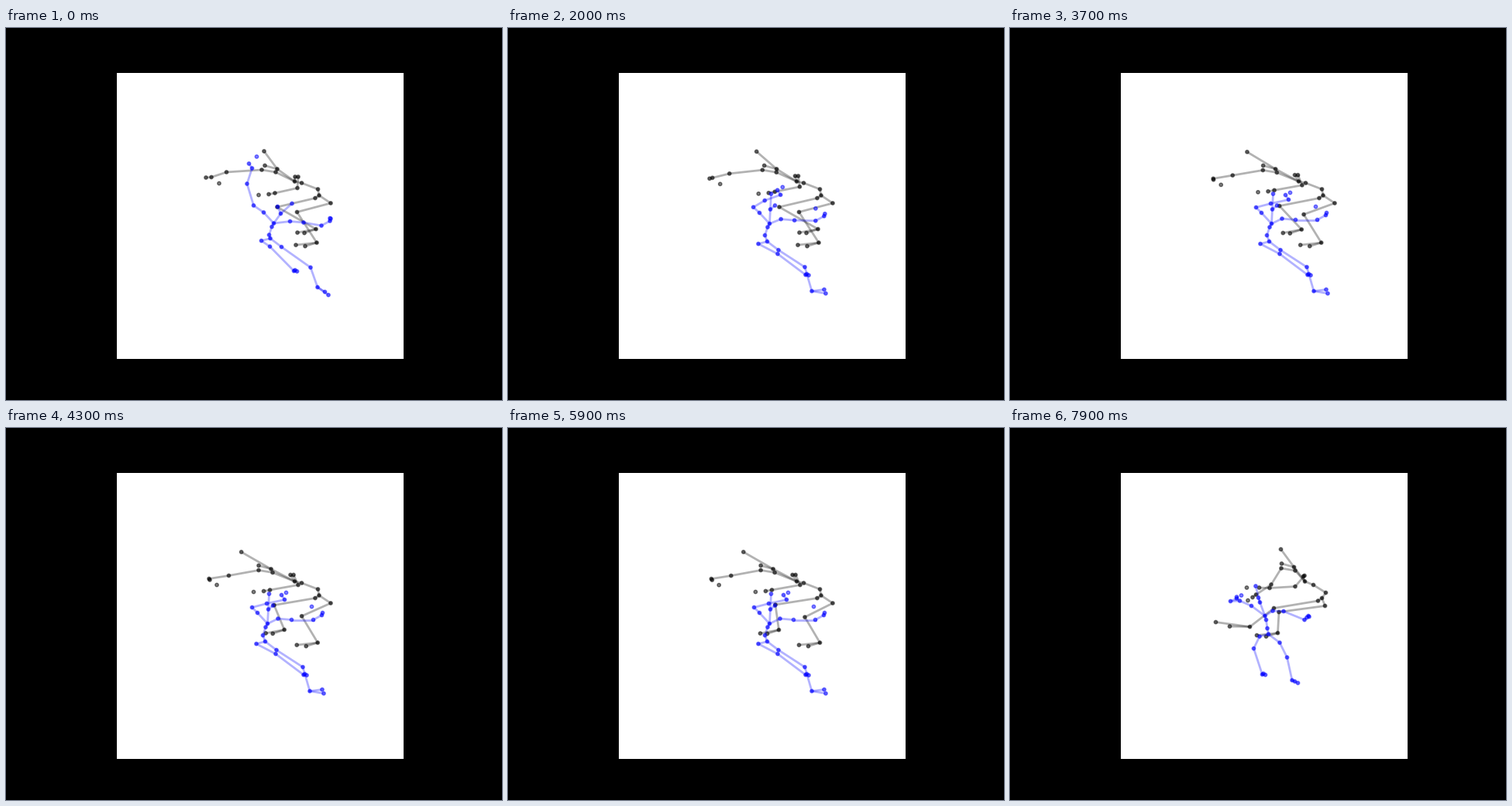
Write a matplotlib script that moves like this. It is 640x480 px and loops after 8000 ms.

```python
import numpy as np
import matplotlib.pyplot as plt
from matplotlib.animation import FuncAnimation
from matplotlib.collections import LineCollection
from matplotlib.patches import Rectangle

W, H, DPI = 640, 480, 100
FRAMES, INTERVAL = 80, 100

SPINE, ARM, LEG = 7, 6, 5
ARMS = (SPINE, SPINE + ARM)
LEGS = (SPINE + 2 * ARM, SPINE + 2 * ARM + LEG)


def skeleton():
    """Parent of each joint, and the joints whose bone is drawn."""
    parent = [-1, 0, 1, 2, 3, 4, 4]
    for s in ARMS:
        parent += [3, s, s + 1, s + 2, s + 3, s + 3]
    for s in LEGS:
        parent += [0, s, s + 1, s + 2, s + 2]
    loose = {0} | {s + ARM - 1 for s in ARMS}
    return parent, [j for j in range(len(parent)) if j not in loose]


PARENT, DRAWN = skeleton()

# A bone is an offset x + yj from its parent, with the keys
# (always), (before, after the turn) or (start, hold, end).
# Spine: hip, waist, chest, neck, skull, crown, nose.
# Arm: collar, shoulder, elbow, wrist, hand, loose fingertip.
# Leg: hip, knee, ankle, two toes.
dark_body = dict(
    spine=[(404.5+216.5j, 403+220j), (-1.5-8j, 5-7j), (-21-8j, -16-10j),
           (-9-2j, -11-4.5j), (-22.5-16j, -30.5-16j, -14-18.5j),
           (-17-23j, -38.5-22j, -17-23j), (-16-4.5j,)],
    arm_l=[(-24.5-12j, -28.5-11.5j, -12.5-14j), (-18-3j,),
           (-45.5+3j, -38.5+7j, -13+21j), (-19.5+6.5j, -25.5+4j, -19.5+13j),
           (-7+.5j, 1+1.5j, -4.5+3.5j), (10+8j, -10.5+7.5j)],
    arm_r=[(.5-6j, -5.5-8.5j, -2-6.5j), (4, 1.5-1j),
           (-1+14.5j, 6+13j, -12+14j), (-29+6.5j, -36.5+6.5j, -33+2j),
           (-8+1.5j, -13.5-.5j), (-21+2.5j, -29.5-.5j)],
    leg_l=[(-5+3.5j,), (-49+11.5j, -54+8.5j, -57+9.5j),
           (50+28.5j, 4.5+32.5j, -31+24j), (-15+5j, -26-.5j), (-24+4.5j, -44-6j)],
    leg_r=[(15+10j, 4+10j), (-43.5+11.5j, -36+18j, -59.5+8j),
           (25.5+39.5j, 19.5+33j, -1.5+27j), (-15+4.5j,), (-27+3j,)],
)
blue_body = dict(
    spine=[(341.5+272j, 335+276j, 334+266.5j), (-1.5-4.5j, -3-8j, -1.5-7.5j),
           (3.5-10.5j, -1.5-11j), (2.5-4.5j, -1.5-5j),
           (9-12.5j, 1-18.5j, -6.5-17.5j), (14.5-13j, 1-20j, -5.5-21j),
           (-4-9j, 6-5j, -2-6j)],
    arm_l=[(-13-14j, -17.5-13j), (-13-9j, -7-7j, -15-6.5j),
           (-8.5-28j, 19-5j, -12+.5j), (6.5-20j, 23-5j, 8-3.5j),
           (-4-6j, -2j), (6-15j, 2-9j, 6-4j)],
    arm_r=[(21-2.5j, 13.5-6.5j, 10-6.5j), (17.5+1.5j, 14+.5j),
           (23+4j, 28, 27+11j), (11-6j, 5-5j),
           (1-3j, 1+1j), (-3.5j, -13-11j, -2+2j)],
    leg_l=[(-11.5+3j,), (11+7.5j, 25+13j, -7.5+15.5j),
           (31+31.5j, 36+27j, 11+33.5j), (1.5-1j,), (4+.5j,)],
    leg_r=[(14.5+11j,), (37.5+26.5j, 34+22j, 9.5+19j),
           (9+25.5j, 9+31j, 6.5+29.5j), (9.5+6j, 16-2j, 3.5+1.5j),
           (14+10j, 18+3j, 7.5+3.5j)],
)

# Frames over which a limb eases into the hold, then into the end.
dark_timing = dict(spine=(0, 45, 58, 79), arm=(0, 45, 58, 79), leg=(25, 50, 60, 72))
blue_timing = dict(spine=(0, 20, 62, 69), arm=(5, 25, 62, 69), leg=(0, 20, 62, 69))


def ease(t, a, b):
    u = np.clip((t - a) / (b - a), 0, 1)
    return u * u * (3 - 2 * u)


def motion(body, timing):
    """Joint positions for every frame, built up from the hip."""
    t = np.arange(FRAMES)
    bones = []
    for name, limb in body.items():
        a, b, c, d = timing[name.split("_")[0]]
        for keys in limb:
            start, hold, end = keys[0], keys[len(keys) // 3], keys[-1]
            bones.append(start + (hold - start) * ease(t, a, b)
                         + (end - hold) * ease(t, c, d))
    joints = []
    for p, bone in zip(PARENT, bones):
        joints.append(bone if p < 0 else joints[p] + bone)
    z = np.array(joints).T
    return np.stack([z.real, z.imag], axis=-1) - 0.5


class Dancer:
    def __init__(self, ax, color, path, z):
        self.path = path
        self.lines = LineCollection([], colors=color, alpha=0.3, linewidths=2,
                                    capstyle="projecting", zorder=z)
        ax.add_collection(self.lines)
        # One colour per dot keeps the dots off the pixel grid.
        self.dots = ax.scatter(*path[0].T, s=10, c=[color] * len(PARENT),
                               alpha=0.5, linewidths=1, zorder=z + 1)

    def pose(self, f):
        p = self.path[f]
        self.lines.set_segments([(p[PARENT[j]], p[j]) for j in DRAWN])
        self.dots.set_offsets(p)
        return self.lines, self.dots


fig = plt.figure(figsize=(W / DPI, H / DPI), dpi=DPI, facecolor="black")
ax = fig.add_axes([0, 0, 1, 1])
ax.axis("off")
ax.add_patch(Rectangle((143, 58), 370, 369, facecolor="white", edgecolor="none", zorder=0))
dancers = [Dancer(ax, "black", motion(dark_body, dark_timing), 1),
           Dancer(ax, "blue", motion(blue_body, blue_timing), 3)]
ax.set_xlim(0, W)
ax.set_ylim(H, 0)


def update(f):
    return [artist for d in dancers for artist in d.pose(f)]


anim = FuncAnimation(fig, update, frames=FRAMES, interval=INTERVAL,
                     repeat=True, repeat_delay=0, blit=False)
plt.show()
```
